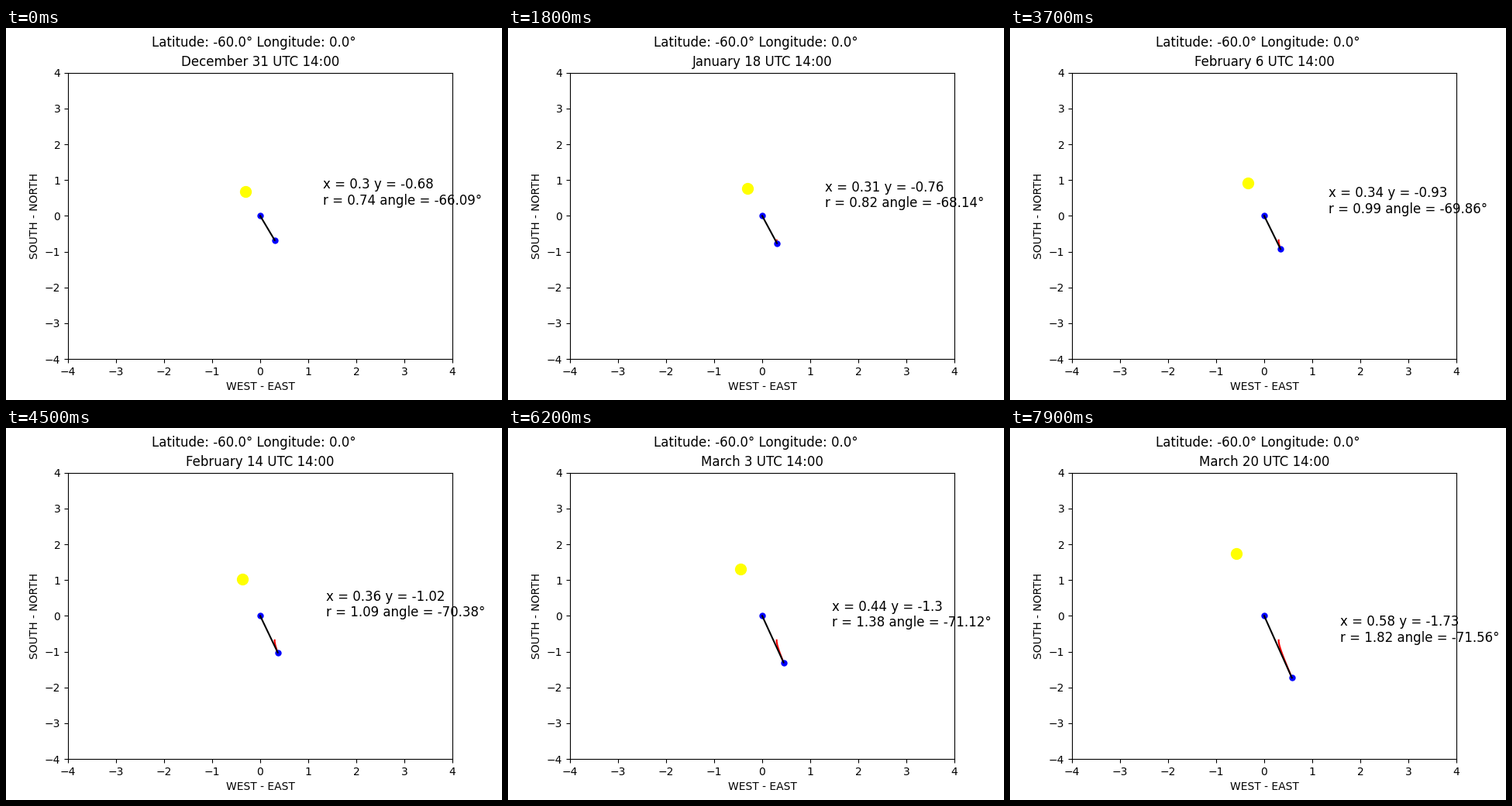
Recreate the animation shown at these times as a matplotlib script. Size 640x480 px, loop 8 s.

```python
import numpy as np
import matplotlib.pyplot as plt
from matplotlib.animation import FuncAnimation

FRAMES = 80
LAT, LON, HOUR = -60.0, 0.0, 14
TILT = np.radians(23.5)
EQUINOX = 79.062          # days from the first frame to the March equinox
MONTHS = [("December", 31), ("January", 31), ("February", 28), ("March", 31)]


def date_label(day):
    """Day 0 is December 31."""
    d = day + 31
    for name, length in MONTHS:
        if d <= length:
            return f"{name} {d} UTC {HOUR:02d}:00"
        d -= length


def shadow(day):
    """Tip of the shadow of a unit gnomon, east and north."""
    phi = np.radians(LAT)
    lam = 2 * np.pi * (day - EQUINOX) / 365
    ra = np.arctan2(np.cos(TILT) * np.sin(lam), np.cos(lam))
    dec = np.arcsin(np.sin(TILT) * np.sin(lam))
    hour = np.radians(15 * (HOUR - 12) + LON + 0.0025) + lam - ra
    east = -np.cos(dec) * np.sin(hour) * np.cos(phi)
    north = np.cos(phi) * np.sin(dec) - np.sin(phi) * np.cos(dec) * np.cos(hour)
    up = np.sin(phi) * np.sin(dec) + np.cos(phi) * np.cos(dec) * np.cos(hour)
    return -east / up, -north / up


xs, ys = shadow(np.arange(FRAMES))

fig, ax = plt.subplots(figsize=(6.4, 4.8), dpi=100)
fig.suptitle(f"Latitude: {LAT}° Longitude: {LON}°")
ax.set(xlim=(-4, 4), ylim=(-4, 4), xlabel="WEST - EAST", ylabel="SOUTH - NORTH")
title = ax.set_title("")

trail, = ax.plot([], [], "r-")
sun, = ax.plot([], [], "o", color="yellow", markersize=10)
ends, = ax.plot([], [], "bo", markersize=5)
rod, = ax.plot([], [], "k-")
info = ax.text(0, 0, "", fontsize=12)


def update(i):
    x, y = float(xs[i]), float(ys[i])
    r, angle = np.hypot(x, y), np.degrees(np.arctan2(y, x))
    title.set_text(date_label(i))
    trail.set_data(xs[:i + 1], ys[:i + 1])
    sun.set_data([-x], [-y])
    ends.set_data([0, x], [0, y])
    rod.set_data([0, x], [0, y])
    info.set_position((x + 1, y + 1))
    info.set_text(f"x = {round(x, 2)} y = {round(y, 2)}\n"
                  f"r = {round(float(r), 2)} angle = {round(float(angle), 2)}°")
    return title, trail, sun, ends, rod, info


anim = FuncAnimation(fig, update, frames=FRAMES, interval=100,
                     repeat=True, repeat_delay=0)
plt.show()
```
